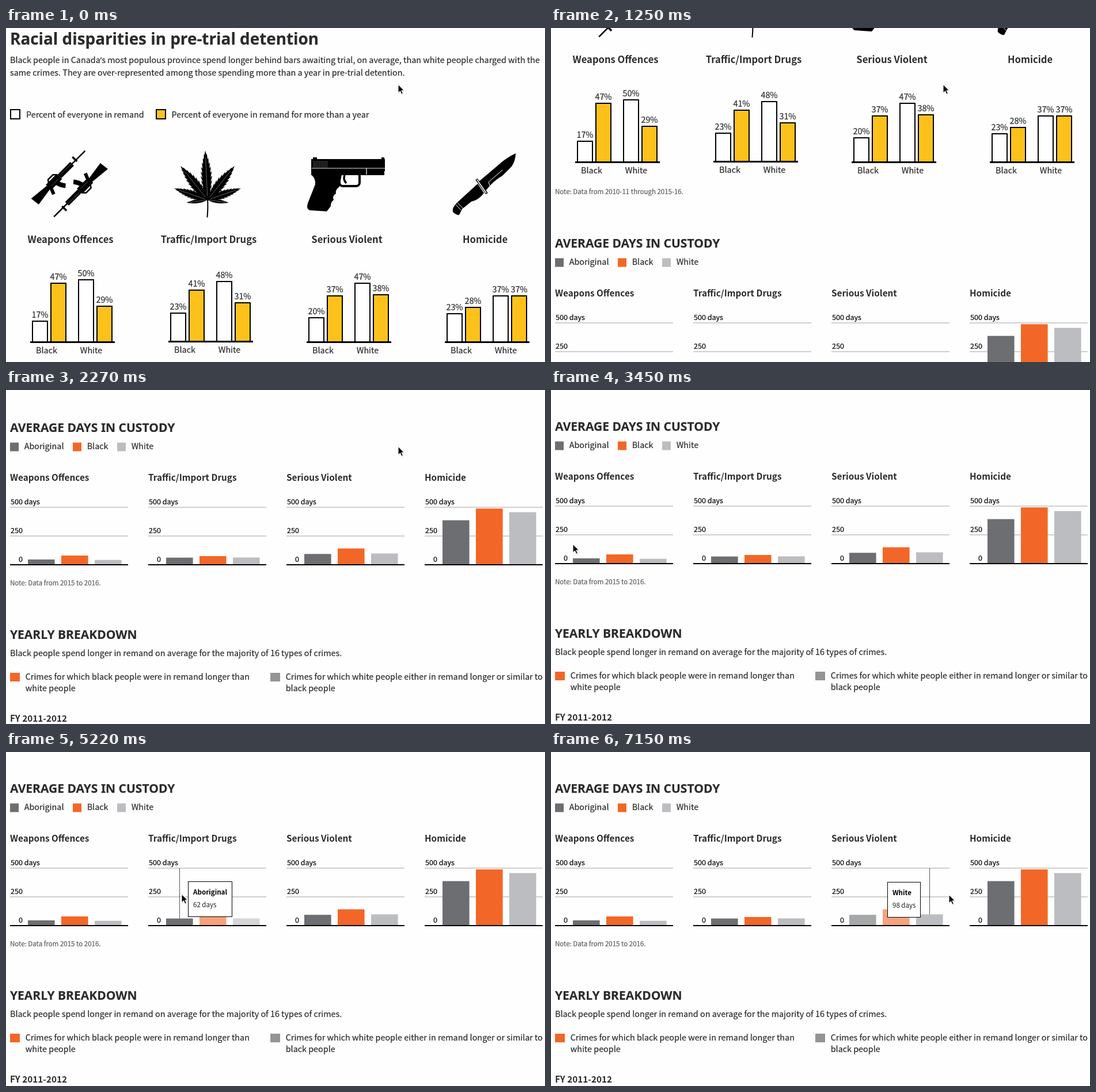
Animation of 936x581 px, one loop 8000 ms. Source, as an HTML page:

```html
<!DOCTYPE html>
<html lang="en">
<head>
<meta charset="utf-8">
<title>Racial disparities in pre-trial detention</title>
<style>
html, body { margin: 0; width: 100%; height: 100%; overflow: hidden; background: #fefefe; }
svg { display: block; width: 936px; height: 581px; }
text {
  font: 14.36px "Noto Sans CJK SC", "Noto Sans CJK JP", "Noto Sans CJK KR", "Noto Sans", sans-serif;
  fill: #2b2b2b; stroke: #2b2b2b; stroke-width: .2px;
}
.title { font: 700 27.85px "Noto Sans", "Open Sans", sans-serif; }
.head { font: 600 21px "Noto Sans", "Open Sans", sans-serif; }
.mid { text-anchor: middle; }
.name { font-size: 16.6px; font-weight: 700; stroke: none; }
.sub { font-size: 15.3px; font-weight: 700; stroke: none; }
.note { font-size: 11.5px; fill: #5c5c5c; stroke: #5c5c5c; }
.tick { font-size: 12.55px; fill: #000; stroke: #000; }
.tip { font-size: 11.5px; fill: #222; stroke: none; }
.tipname { font-size: 11.6px; font-weight: 700; fill: #000; stroke: none; }
.quote { font-family: "Noto Sans", "Open Sans", sans-serif; }
</style>
</head>
<body>
<svg viewBox="0 0 936 581">
  <g id="page"></g>
  <g id="tooltip">
    <rect id="box" x=".5" y=".5" height="61" fill="#fff" stroke="#000"/>
    <text id="tipName" class="tipname" x="9" y="23"></text>
    <text id="tipDays" class="tip" x="9" y="45"></text>
  </g>
  <g id="cursor">
    <path d="M1.5 2.5V17.5L5 14.2L7.3 19.5L10 18.3L7.7 13.2H12.3Z" opacity=".2"/>
    <path d="M1 1V16.2L4.5 12.9L6.8 18.2L9.4 17L7.1 11.9H11.7Z" stroke="#fff" stroke-width="1.1"/>
  </g>
</svg>
<script>
const $ = id => document.getElementById(id);
const CRIMES = ['Weapons Offences', 'Traffic/Import Drugs', 'Serious Violent', 'Homicide'];
const GROUPS = ['Aboriginal', 'Black', 'White'];
const COLORS = ['#6d6e71', '#f26727', '#bcbdc1'];
const YELLOW = '#fcc21b';
const REMAND = [[17, 47, 50, 29], [23, 41, 48, 31], [20, 37, 47, 38], [23, 28, 37, 37]];
const DAYS = [[46, 80, 42], [62, 75, 63], [94, 142, 98], [387, 489, 457]];
const PITCH = 240, ZERO = 926;

const text = (x, y, str, cls = '') => `<text x="${x}" y="${y}" class="${cls}">${str}</text>`;
const rect = (x, y, w, h, fill = '#000', extra = '') =>
  `<rect x="${x}" y="${y}" width="${w}" height="${h}" fill="${fill}" ${extra}/>`;
const framed = (x, y, w, h, fill) => rect(x, y, w, h, fill, 'stroke="#000" stroke-width="2"');
const path = d => `<path d="${d}"/>`;
const line = (d, w = 1, color = '#fff') => `<path d="${d}" fill="none" stroke="${color}" stroke-width="${w}"/>`;

function rifles() {
  const stroke = (d, w) => line(d, w, '#000');
  const gun = '<g transform="translate(49 302) rotate(-45)">' +
    path('M0-7.5L36-4V4L2 9Z') +
    stroke('M35 0H62', 13) + stroke('M62 0H93', 9) + stroke('M92 0H125', 2.6) +
    stroke('M41-6L44-10H56L60-6', 2.5) + stroke('M102 3V-8', 3.5) +
    stroke('M51 5Q53 13 58 19', 8) + stroke('M37 5L33 15', 6) +
    line('M64-1H92M40 2H58', .7, '#777') + '</g>';
  return gun + `<g transform="rotate(180 110.3 271)">${gun}</g>`;
}

function leaflet(tipX, tipY, width) {
  const x0 = 350, y0 = 299, dx = tipX - x0, dy = tipY - y0, len = Math.hypot(dx, dy), teeth = 11;
  const at = (s, h) => `${(x0 + dx * s - dy / len * h).toFixed(1)} ${(y0 + dy * s + dx / len * h).toFixed(1)}`;
  const left = [], right = [];
  for (let i = 1; i < teeth; i++) {
    const s = i / teeth, h = width * Math.sin(Math.PI * s ** .85);
    left.push(at(s + .03, h * 1.12), at(s, h * .8));
    right.unshift(at(s, -h * .8), at(s + .03, -h * 1.12));
  }
  return path('M' + [at(0, 0), ...left, at(1, 0), ...right].join('L') + 'Z') +
    line(`M${at(.08, 0)}L${at(.85, 0)}`, .6, '#aaa');
}

function leaf() {
  const pair = (dx, y, w) => leaflet(350 - dx, y, w) + leaflet(350 + dx, y, w);
  return leaflet(346, 213, 9) + pair(47, 240, 8.5) + pair(58, 279, 7) + pair(37, 304, 3.5) +
    line('M350 297Q351 312 349.5 329.5', 2, '#000');
}

function pistol() {
  let ridges = '';
  for (let x = 534; x < 560; x += 2.6) ridges += `M${x} 231V243`;
  return rect(579, 252, 35, 23, '#fff', 'rx="6" stroke="#000" stroke-width="4"') +
    line('M588 256Q585 264 591 270', 3.5, '#000') +
    rect(530, 228, 128, 21) + rect(530, 248, 127, 8) + rect(533, 225, 7, 4) + rect(652, 225, 5, 4) +
    path('M530 255H583L579 276Q571 282 573 288Q566 292 569 299Q563 304 564 310L557 319L527 317Q521 314 524 305L537 272Q538 262 530 255Z') +
    line('M531 244H658', .9) + line('M626 244V255', 1.2) + line(ridges, .6, '#888');
}

function knife() {
  return path('M820 268L853 240Q868 226 885 218Q885 231 878 241L862 257Q846 266 833 283Z') +
    path('M819 271L783 304Q774 313 776 320Q782 326 787 325L792 315L808 302Q820 300 830 287Z') +
    line('M817 263L835 288', 4, '#000') + line('M818 264L834 287', 1.6) +
    line('M840 274L838 268L862 247', 1) + line('M784 304L794 314M781 307L790 317', .9);
}

function remandChart(values, i) {
  const x0 = 45 + PITCH * i, base = i === 1 ? 545 : 546;
  const bars = values.map((v, k) => {
    const x = x0 + 32 * k + (k > 1 ? 16 : 0), top = Math.round(base + .5 - 2.2 * v);
    return framed(x + 1, top + 1, 26, base - top - 1, k % 2 ? YELLOW : '#fff') +
      text(x + 14, top - 5, v + '%', 'mid');
  }).join('');
  return bars + rect(x0 - 3, base - 1, 147, 3) +
    text(x0 + 25.5, base + 20, 'Black', 'mid') + text(x0 + 103, base + 20, 'White', 'mid');
}

const barCenter = (chart, k) => 61.3 + PITCH * chart + 58 * k;

function daysChart(values, i) {
  const x = 7 + PITCH * i;
  return text(x, 780, CRIMES[i], 'sub') +
    rect(x, 825, 205, 2, '#d0d0d0') + rect(x, 875, 205, 2, '#d0d0d0') +
    rect(0, 826, 1, 0, '#555', `id="hair${i}"`) +
    values.map((v, k) => rect(barCenter(i, k) - 23.3, ZERO - v / 5, 46.6, v / 5, COLORS[k], `class="bar${i}"`)).join('') +
    rect(x, ZERO - 1, 205, 2) +
    text(x + 1, 821, '500 days', 'tick') + text(x + 1, 871, '250', 'tick') + text(x + 15, 921, '0', 'tick');
}

const key = (x, y, w, color, ...lines) =>
  rect(x, y, w, 15, color) + lines.map((s, i) => text(x + w + 9.7, y + 11.5 + 20 * i, s)).join('');

$('page').innerHTML = [
  text(7, 28.5, 'Racial disparities in pre-trial detention', 'title'),
  text(7, 61, 'Black people in Canada<tspan class="quote">’</tspan>s most populous province spend longer behind bars awaiting trial, on average, than white people charged with the'),
  text(7, 83, 'same crimes. They are over-represented among those spending more than a year in pre-trial detention.'),
  framed(8, 142, 16, 16, '#fff'), text(35, 156, 'Percent of everyone in remand'),
  framed(261, 142, 16, 16, YELLOW), text(287.5, 156, 'Percent of everyone in remand for more than a year'),
  rifles(), leaf(), pistol(), knife(),
  ...CRIMES.map((c, i) => text(112 + PITCH * i, 374, c, 'mid name')),
  ...REMAND.map(remandChart),
  text(7, 602, 'Note: Data from 2010-11 through 2015-16.', 'note'),
  text(7, 695, 'AVERAGE DAYS IN CUSTODY', 'head'),
  ...GROUPS.map((g, k) => key([7, 116, 193][k], 713.5, 15, COLORS[k], g)),
  ...DAYS.map(daysChart),
  text(7, 962, 'Note: Data from 2015 to 2016.', 'note'),
  text(7, 1055, 'YEARLY BREAKDOWN', 'head'),
  text(7, 1085, 'Black people spend longer in remand on average for the majority of 16 types of crimes.'),
  key(7, 1114, 17, COLORS[1], 'Crimes for which black people were in remand longer than', 'white people'),
  key(459, 1114, 17, '#949494', 'Crimes for which white people either in remand longer or similar to', 'black people'),
  text(7, 1199, 'FY 2011-2012', 'sub')
].join('');

const FIRST = 500, STEP = 147.8, LOOP = 8000, HOVER_STEP = 24;
const SCROLL = [[-1, 0], [2, 175], [8, 451], [12, 622], [13, 624]];
const POINTER = [
  [12, 680, 97], [14, 509, 119], [17, 130, 224], [20, 37, 267], [23, 37, 267],
  [31, 245, 246], [32, 304, 246], [36, 413, 247], [38, 413, 247], [45, 690, 247]
];

function along(keys, step) {
  const next = keys.findIndex(p => p[0] > step);
  if (next < 1) return (next ? keys[keys.length - 1] : keys[0]).slice(1);
  const a = keys[next - 1], b = keys[next], f = (step - a[0]) / (b[0] - a[0]);
  return a.slice(1).map((v, i) => Math.round(v + (b[i + 1] - v) * f));
}

const move = (id, x, y) => $(id).setAttribute('transform', `translate(${x} ${y})`);

function showTooltip(chart, k, y) {
  const center = barCenter(chart, k), days = DAYS[chart][k];
  $('tipName').textContent = GROUPS[k];
  $('tipDays').textContent = days + ' days';
  const w = Math.round(18 + Math.max($('tipName').getComputedTextLength(), $('tipDays').getComputedTextLength()));
  $('box').setAttribute('width', w - 1);
  const flip = center + 15 + w > 212 + PITCH * chart;
  move('tooltip', Math.round(flip ? center - 15 - w : center + 15), y - 21);
  const hair = $('hair' + chart);
  hair.setAttribute('x', Math.floor(center));
  hair.setAttribute('height', ZERO - days / 5 - 826);
}

function draw(t) {
  const step = Math.max(-1, Math.floor((t - FIRST) / STEP + .1));
  const [scroll] = along(SCROLL, step), [x, y] = along(POINTER, step);
  move('page', 0, -scroll);
  move('cursor', x, y);
  const hover = step >= HOVER_STEP;
  const chart = hover ? Math.floor((x - 7) / PITCH) : -1;
  const k = Math.max(0, Math.min(2, Math.round((x - barCenter(chart, 0)) / 58)));
  $('tooltip').style.display = hover ? '' : 'none';
  DAYS.forEach((_, i) => {
    $('hair' + i).style.display = i === chart ? '' : 'none';
    document.querySelectorAll('.bar' + i).forEach((bar, j) => {
      bar.style.opacity = i === chart && j !== k ? .6 : 1;
    });
  });
  if (hover) showTooltip(chart, k, y);
}

const start = performance.now();
function tick() {
  draw((performance.now() - start) % LOOP);
  requestAnimationFrame(tick);
}
tick();
</script>
</body>
</html>
```
